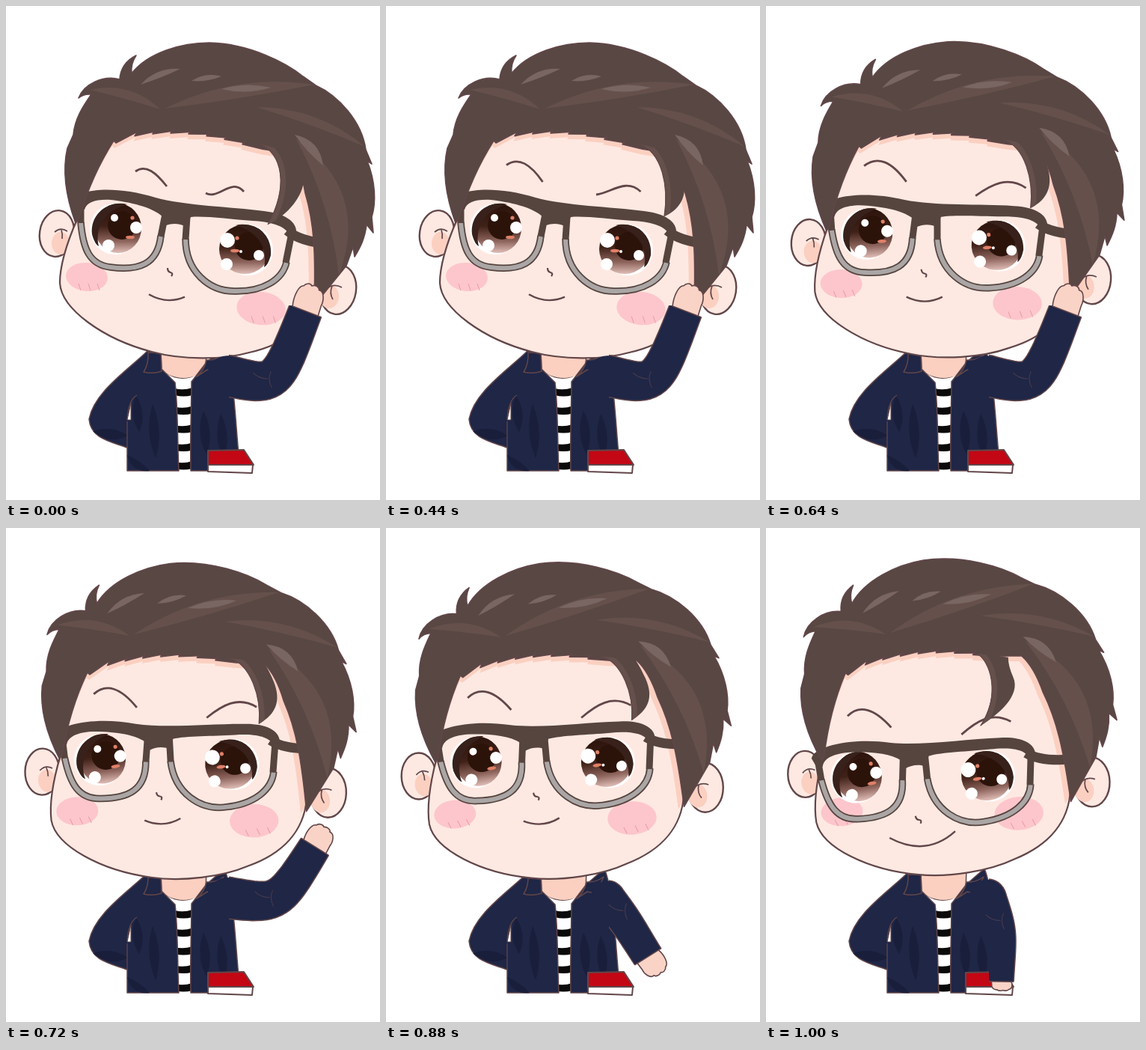
These frames come from a looping animation (500x660 px, 1.24 s). An HTML page with a canvas:

```html
<!DOCTYPE html>
<html lang="en">
<head>
<meta charset="utf-8">
<title>Raised eyebrow</title>
<style>
html, body { margin: 0; width: 100%; height: 100%; overflow: hidden; background: #fff; }
canvas { display: block; width: 500px; height: 660px; }
</style>
</head>
<body>
<canvas id="stage" width="500" height="660"></canvas>
<script>
const ctx = document.getElementById('stage').getContext('2d');
const LOOP = 1240, STEP = 40, RAD = Math.PI / 180;

const INK = '#624649', HAIR = '#584743', HAIR_LIGHT = '#65504c', SHINE = '#796561';
const SKIN = '#fee9e2', PEACH = '#fbd0c1', NAVY = '#1f2646', NAVY_DARK = '#191e3b';
const FRAME = '#56443f', GREY = '#aaa6a5', BLUSH = '#fdc6cc';

// ---- helpers ----
const P = d => new Path2D(d);
const lerp = (a, b, u) => a + (b - a) * u;
const mix = (a, b, u) => a.map((v, i) => lerp(v, b[i], u));
const ramp = (t, from, to) => Math.min(1, Math.max(0, (t - from) / (to - from)));

function fill(path, color) { ctx.fillStyle = color; ctx.fill(path); }
function line(path, width = 2, color = INK) {
  ctx.strokeStyle = color;
  ctx.lineWidth = width;
  ctx.stroke(path);
}
function shape(path, color, width) { fill(path, color); line(path, width); }
function oval(x, y, rx, ry, color, rot = 0) {
  ctx.fillStyle = color;
  ctx.beginPath();
  ctx.ellipse(x, y, rx, ry, rot, 0, 7);
  ctx.fill();
}
function at(x, y, draw) {
  ctx.save();
  ctx.translate(x, y);
  draw();
  ctx.restore();
}
function clipped(path, draw) {
  ctx.save();
  ctx.clip(path);
  draw();
  ctx.restore();
}

// pointed sliver between two ends, bent sideways by bow
function leaf(color, x0, y0, x1, y1, bow, thick) {
  const dx = x1 - x0, dy = y1 - y0, len = Math.hypot(dx, dy);
  const side = k => `${(x0 + x1) / 2 - dy / len * k} ${(y0 + y1) / 2 + dx / len * k}`;
  fill(P(`M${x0} ${y0}Q${side(bow + thick)} ${x1} ${y1}Q${side(bow - thick)} ${x0} ${y0}Z`), color);
}

// ---- head shapes ----
const JAW = 'M95 285C82 315 72 345 72 370C74 405 130 445 195 462C235 473 290 473 325 463C375 452 405 425 414 385';
const FACE = P(JAW + 'L410 210L330 150H160L95 210Z');

function fringe() {
  const edge = x => 167 + 0.0016 * (x - 220) ** 2;
  let d = '';
  for (let x = 343; x > 175; x -= 24) d += `L${x} ${edge(x)}L${x - 27} ${edge(x - 27) + 3}l4 -6`;
  return d;
}
const HAIR_SHAPE = P('M97 123C104 104 130 92 152 98C153 84 160 73 174 66C168 75 167 82 168 90'
  + 'C190 62 235 49 272 49C325 50 375 76 397 94L414 106C445 120 476 155 481 192L489 211L483 207'
  + 'C494 235 495 262 489 282L491 303L482 292C480 310 474 322 466 335L464 322L455 347L412 400'
  + 'C414 330 412 290 400 250C397 232 392 212 380 197' + fringe()
  + 'L147 183L144 180C128 205 112 235 97 285L93 290C82 260 74 225 82 190L90 172C92 150 103 134 114 118Q104 117 97 123Z');

const BAR = P('M92 259C97 243 150 240 200 256C240 267 300 268 345 274C372 277 390 288 388 304L378 306C375 293 350 288 330 287C300 285 265 280 247 282L241 295C232 290 222 290 214 293L210 282C195 268 165 262 140 259C120 258 108 262 105 272L97 272Z');
const RIMS = P('M100 260V290M213 278L207 308M242 282L240 312M383 298L374 343');
const CUPS = P('M100 289C103 325 112 346 140 349C178 354 203 345 207 307M240 311C240 355 272 381 305 381C345 382 370 365 375 342');

// brow: start, reach, and the lift of each control point
const FROWN = [[173, 221, 42, 20, 17, 11], [267, 250, 51, -2, -10, 20]];
const RAISED = [[149, 204, 55, 25, 21, 21], [295, 254, 68, -6, 12, 20]];

// arm: angle and length of upper arm, angle and length of forearm, half cuff, hand length
const PROP = [13, 67, -69, 108, 22, 37];
const SLIP = [8, 69, -58, 91, 21, 31];
const HANG = [52, 40, 58, 55, 20, 29];
const REST = [68, 52, 91, 63, 16, 13];
const FIST = P('M0 -.9C.4 -1.1 .8 -1 .85 -.7C1 -.6 1.02 -.3 .95 -.2C1.05 0 1 .3 .9 .35C.95 .7 .6 .9 .4 .85L0 .9Z');

function drawBody() {
  shape(P('M207 455H268L267 485C255 502 220 502 207 485Z'), PEACH, 1.5);
  fill(P('M216 492C228 500 246 500 257 491L250 621H228Z'), '#fff');
  for (let i = 0; i < 5; i++) {
    const y = 511 + i * 24.5;
    fill(P(`M226 ${y}Q237 ${y + 3} 249 ${y - 1}v10Q237 ${y + 12} 226 ${y + 9}Z`), '#0b0a0b');
  }
  shape(P('M190 460C165 485 118 515 111 552C113 578 140 582 162 590V621H231C229 580 230 535 226 503L208 485L207 460Z'), NAVY, 1.5);
  shape(P('M268 476L292 455C304 485 306 545 311 599V621H247C246 580 248 530 248 502Z'), NAVY, 1.5);
  leaf(NAVY_DARK, 116, 568, 163, 574, 2, 14);
  leaf(NAVY_DARK, 162, 600, 192, 621, 6, 10);
  for (const [x, y, h] of [[174, 521, 48], [196, 532, 72], [264, 541, 58], [287, 545, 60]])
    leaf(NAVY_DARK, x, y, x + 4, y + h, 0, 13);
  shape(P('M167 530L162 553H167Z'), '#fff', 1);
  line(P('M175 520C166 525 163 537 162 552M162 555V590'), 1.3);
  shape(P('M190 463H207L208 488Q196 492 184 489Q191 478 190 463Z'), NAVY, 1.5);
  shape(P('M268 473Q280 474 291 466Q284 480 285 489L269 486L255 495Q265 487 268 473Z'), NAVY, 1.5);
}

function drawBook(slide) {
  const x = 270 - 3 * slide;
  shape(P(`M${x} 594L318 593L331 613H${x}Z`), '#c30714', 2);
  shape(P(`M${x} 613H330L329 624L${x} 622Z`), '#fff', 2);
}

function drawEye(right) {
  const shade = ctx.createLinearGradient(0, -33, 0, 34);
  shade.addColorStop(0, '#2b130b');
  shade.addColorStop(0.45, '#3f2118');
  shade.addColorStop(0.75, '#8d645c');
  shade.addColorStop(1, '#e6c4be');
  oval(right ? 4 : -4, 1, 34, 34, '#fff');
  oval(0, 0, right ? 34 : 31, 33, shade);
  oval(right ? 6 : 5, -4, 19, 19, '#2c130a');
  ctx.save();
  if (right) ctx.scale(-1, 1);
  fill(P('M12 -32C-12 -38 -38 -20 -35 8C-32 19 -29 22 -26 24C-31 2 -22 -22 12 -32Z'), '#38211b');
  ctx.restore();
  const spots = right ? [[19, 8, 7], [-23, -12, 10], [-24, 20, 8], [-5, 3, 2]]
                      : [[24, -1, 8], [-5, -14, 5], [-13, 23, 8]];
  for (const [x, y, r] of spots) oval(x, y, r, r, '#fff');
  const [dot, dash] = right ? [[-10, -15], [-13, 2]] : [[19, -14], [16, 12]];
  oval(...dot, 2.6, 2.6, '#df8067');
  oval(...dash, 6, 2.3, '#df8067');
}

function drawCheek(x, y, size) {
  oval(x, y, 28 * size, 19 * size, BLUSH, 0.1);
  for (const k of [-11, 2, 14]) line(P(`M${x + k * size} ${y + 9 * size}l3 9`), 1, '#e89ca4');
}

function drawBrow([x, y, dx, dy, lift1, lift2], drop) {
  y += drop;
  line(P(`M${x} ${y}C${x + dx / 3} ${y + dy / 3 - lift1} ${x + dx * 2 / 3} ${y + dy * 2 / 3 - lift2} ${x + dx} ${y + dy}`), 2.8);
}

function drawMouth(x, y, half, sag) {
  const slope = half * 0.07;
  line(P(`M${x - half} ${y - slope}Q${x} ${y + sag} ${x + half} ${y + slope}`), 2.4);
}

function drawLock(shift, [x, y]) {
  const inner = `M${338 + shift / 2} 184C${370 + shift} 196 ${378 + shift} 242 ${x} ${y}`;
  const lock = P(`${inner}C${x + 24} ${y - 10} ${404 + shift} 250 ${397 + shift} 223Q${393 + shift} 208 ${385 + shift * 0.7} 196Z`);
  fill(lock, HAIR);
  clipped(lock, () => line(P(inner), 14, HAIR_LIGHT));
  line(P(inner), 1.2);
}

function drawGlasses() {
  line(P('M376 300Q392 314 430 318'), 13, FRAME);
  line(CUPS, 9.5, FRAME);
  line(CUPS, 6, GREY);
  line(RIMS, 9, FRAME);
  fill(BAR, FRAME);
}

function drawEars() {
  for (const [x, y, rx, ry] of [[68, 304, 23, 31], [444, 379, 24, 33]]) {
    const ear = new Path2D();
    ear.ellipse(x, y, rx, ry, 0.15, 0, 7);
    shape(ear, SKIN, 2.4);
  }
  oval(73, 317, 12, 15, PEACH);
  oval(432, 388, 13, 16, PEACH);
  line(P('M65 302Q73 295 82 301M74 299Q76 305 75 311M428 378Q438 370 449 376M436 374Q432 384 437 392'), 1.7);
}

// everything on the head turns as one piece; the nod slides the features
function drawHead({ turn, nod, raise, settled }) {
  ctx.save();
  ctx.translate(270 - 29 * turn + 8 * nod, 290 - 4 * turn - 5 * nod);
  ctx.rotate((-9 * turn - 0.7 * nod) * RAD);
  ctx.translate(-270, -290);

  drawEars();
  fill(FACE, SKIN);
  clipped(FACE, () => {
    at(-2, 7, () => fill(HAIR_SHAPE, PEACH));
    at(-8, 2, () => fill(HAIR_SHAPE, PEACH));
  });
  line(P(JAW), 2.2);
  drawCheek(108, 362, 1);
  drawCheek(341, 404, 1.17);

  const slideX = -12 * nod, slideY = 26 * nod;
  at(150 + slideX, 297 + slideY * 0.85, () => drawEye(false));
  at(319 + slideX, 325 + slideY * 0.85, () => drawEye(true));
  at(slideX, slideY, () => {
    FROWN.forEach((brow, i) => drawBrow(mix(brow, RAISED[i], raise), 7 * turn));
    drawMouth(215 + 6 * turn, 387 - 3 * nod, lerp(24, 44, nod), lerp(12, 31, nod));
    line(P(`M216 ${350 + 8 * nod}q0 5 4 6q4 1 1 5`), 2.2);
    drawGlasses();
  });

  shape(HAIR_SHAPE, HAIR, 1.6);
  leaf(HAIR_LIGHT, 112, 112, 206, 138, -14, 12);
  leaf(HAIR_LIGHT, 212, 137, 412, 105, -14, 18);
  leaf(HAIR_LIGHT, 335, 135, 480, 188, -16, 12);
  leaf(HAIR_LIGHT, 388, 178, 445, 360, -46, 28);
  leaf(SHINE, 180, 105, 233, 84, -6, 8);
  leaf(SHINE, 248, 100, 288, 94, -2, 7);
  leaf(SHINE, 288, 111, 354, 109, 0, 9);
  leaf(SHINE, 386, 172, 424, 213, -8, 12);

  const tip = settled ? mix(mix([372, 281], [361, 275], turn), [310, 280], nod) : [350, 292];
  drawLock(-9 * turn - 24 * nod, tip);
  ctx.restore();
}

function drawArm(pose) {
  const [a1, l1, a2, l2, cuff, reach] = pose;
  const sx = 296, sy = 494;
  const ex = sx + l1 * Math.cos(a1 * RAD), ey = sy + l1 * Math.sin(a1 * RAD);
  const wx = ex + l2 * Math.cos(a2 * RAD), wy = ey + l2 * Math.sin(a2 * RAD);
  const top = 16 + l1 * 0.16;

  const fist = new Path2D();
  fist.addPath(FIST, new DOMMatrix().translate(wx, wy).rotate(a2).scale(reach, cuff * 0.92));
  shape(fist, '#f9d3c6', 1.6);

  // tapered sleeve along a bend from shoulder to wrist
  const upper = [], lower = [];
  for (let i = 0; i <= 24; i++) {
    const u = i / 24, v = 1 - u, k = 3 * u * v;
    const x = sx * v ** 3 + ex * k + wx * u ** 3, y = sy * v ** 3 + ey * k + wy * u ** 3;
    const dx = v * v * (ex - sx) + u * u * (wx - ex), dy = v * v * (ey - sy) + u * u * (wy - ey);
    const r = lerp(top, cuff, u) / Math.hypot(dx, dy);
    upper.push(`${x + dy * r} ${y - dx * r}`);
    lower.unshift(`${x - dy * r} ${y + dx * r}`);
  }
  const sleeve = P(`M${upper.concat(lower).join('L')}Z`);
  const shoulder = new Path2D();
  shoulder.arc(sx, sy, top, 0, 7);
  clipped(P('M298 400H500V660H298Z'), () => {
    line(shoulder, 3);
    line(sleeve, 3);
  });
  fill(shoulder, NAVY);
  fill(sleeve, NAVY);
  const cx = lerp(sx, ex, 0.8), cy = lerp(sy, ey, 0.8);
  line(P(`M${cx + 6} ${cy - 18}q-5 10 1 22M${cx + 2} ${cy - 8}q-12 0 -20 -8`), 1.3, '#43374a');
}

function armPose(t) {
  if (t < 720) return mix(PROP, SLIP, ramp(t, 640, 720));
  if (t < 880) return mix(SLIP, HANG, ramp(t, 720, 880) ** 1.3);
  return mix(HANG, REST, ramp(t, 880, 1000));
}

function render(now) {
  const t = Math.floor((now % LOOP) / STEP) * STEP;
  const nod = ramp(t, 880, 1000);
  ctx.fillStyle = '#fff';
  ctx.fillRect(0, 0, 500, 660);
  ctx.lineJoin = 'round';
  drawBody();
  drawBook(nod);
  drawHead({
    turn: 1 - (1 - ramp(t, 560, 800)) ** 1.4,
    nod,
    raise: ramp(t, 320, 560),
    settled: t >= 320
  });
  drawArm(armPose(t));
}

const start = performance.now();
function loop(now) {
  render(Math.max(0, now - start));
  requestAnimationFrame(loop);
}
render(0);
requestAnimationFrame(loop);
</script>
</body>
</html>
```
